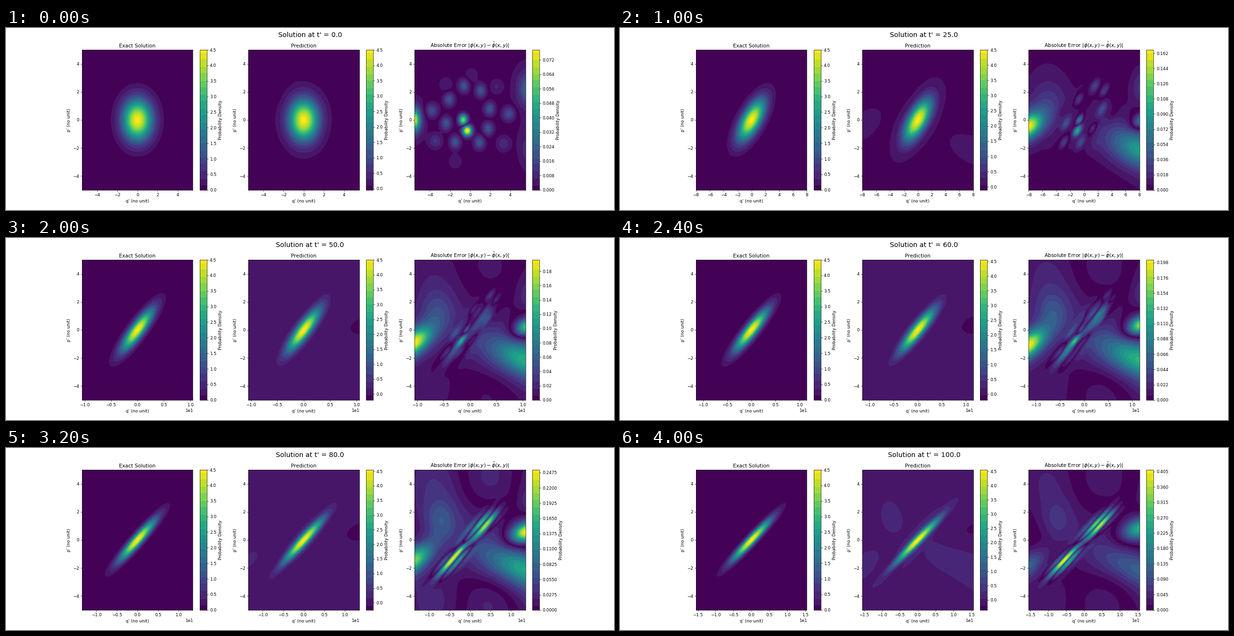
Animation, 1280 px wide and 384 px high, one loop 4200 ms. Source, as a matplotlib script:

```python
import numpy as np
import matplotlib.pyplot as plt
from matplotlib.animation import FuncAnimation
from matplotlib.colors import ListedColormap

FRAMES, STEP = 21, 5.0
SHEAR = 0.0355
PEAK = 4.49

# viridis in flat bands
x = np.linspace(0, 1, 256)
band = np.floor((x + 0.019) / 0.05)
CMAP = ListedColormap(plt.get_cmap("viridis")(np.clip(band * 0.05 + 0.006, 0, 1)))


def gauss(a, b, wa, wb):
    return np.exp(-0.5 * ((a / wa) ** 2 + (b / wb) ** 2))


def lobe(a, b, wa, wb):
    """Like gauss, with longer tails."""
    return (1 + ((a / wa) ** 2 + (b / wb) ** 2) / 6) ** -3


def top_error(t):
    return np.interp(t, [0, 5, 15, 20, 40, 60, 70, 90, 100],
                     [.0774, .1025, .142, .156, .1895, .2015, .2195, .2815, .409])


def edge_lobes(s, p, k):
    """Wide lobes near the borders; s runs from -1 to 1, k from 0 to 1."""
    ease = 1 - np.exp(-5 * k)
    left = (0.077 + 0.42 * k - 0.35 * k ** 2) * lobe(
        s + 1.01, p + 1.8 * k - 2.3 * ease * (s + 1),
        0.07 + 0.15 * ease, 0.5 + 0.1 * ease)
    right = -0.3 * k * lobe(
        s - 1.02, p + 0.4 - 1.2 * k - (s - 1), 0.06 + 0.16 * k, 0.3 + 0.2 * k)
    low = (0.008 + 0.142 * (1 - np.exp(-3.5 * k))) * lobe(
        s - 1.02, p + 2.1 + 1.2 * (s - 1), 0.1 + 0.38 * ease, 0.9)
    high = 0.085 * k * lobe(s + 0.7 - 0.2 * k, p - 1.35, 0.24, 1.2)
    corner = 0.026 * lobe(s - 1.05, p - 2.2 - 0.4 * k, 0.12, 0.8)
    swell = 0.035 * k ** 2 * np.cos(3 * (s + 0.7)) * np.cos(0.7 * (p - 4.5))
    return left + right + low + high + corner + swell


def ripples(u, p, k):
    """A close pair and two rings of spots with alternating sign."""
    pair = 0.079 * np.cos(1.4 * k) * (1 + 0.8 * k) * (
        gauss(u + 0.28, p + 0.76, 0.32, 0.26)
        - 0.8 * gauss(u + 0.68, p, 0.29, 0.26))
    rings = 0
    for n in range(8):
        sign = (-1) ** n
        a = np.radians(41 * n - 60)
        r = 2.2 + 0.35 * np.cos(a - 2.27)
        grow = 0.02 * (1 + np.sin(np.pi * k) - 0.5 * k)
        rings += sign * grow * gauss(
            u - r * np.cos(a), p - r * np.sin(a), 0.36, 0.33)
        a = np.radians(40 * n - 32)
        fade = (0.006 + 0.014 * np.cos(a) ** 8) * np.exp(-3 * k)
        rings += sign * fade * gauss(
            u - 3.9 * np.cos(a), p - 3.2 * np.sin(a), 0.45, 0.36)
    return pair + rings


def ridge(u, p, k):
    """Streaks along the sheared axis whose phase turns over at the centre."""
    phase = 1.15 * (1 - np.tanh(3 * (p + 0.2)))
    along = gauss(np.abs(p + 0.2) - 1.3, u, 0.7, 1.5)
    return 0.48 * k ** 3.5 * along * np.sin(1.6 * u + phase)


def fields(t):
    half, k = 5.5 + 0.1 * t, t / 100
    q, p = np.meshgrid(np.linspace(-half, half, 151), np.linspace(-5, 5, 151))
    u = q - SHEAR * t * p
    exact = PEAK * np.exp(-0.5 * (u ** 2 + p ** 2))
    err = edge_lobes(q / half, p, k) + ripples(u, p, k) + ridge(u, p, k)
    err *= top_error(t) / np.abs(err).max()
    return q, p, exact, err


def pred_levels(t):
    low = -1 - int(t * 6 // 100)
    high = 90 if t < 55 else 91
    return np.arange(low, high + 1) * 0.05


fig = plt.figure(figsize=(20, 6), dpi=64)


def draw(i):
    t = i * STEP
    q, p, exact, err = fields(t)
    levels = pred_levels(t)
    pred = np.clip(exact + err, levels[0] + 1e-3, levels[-1] - 1e-3)
    panels = [
        ("Exact Solution", exact, 100),
        ("Prediction", pred, levels),
        (r"Absolute Error $|\phi(x,y)-\hat{\phi}(x,y)|$", np.abs(err), 100),
    ]
    fig.clear()
    for ax, (title, z, lev) in zip(fig.subplots(1, 3), panels):
        filled = ax.contourf(q, p, z, levels=lev, cmap=CMAP)
        fig.colorbar(filled, ax=ax, label="Probability Density")
        ax.set_title(title)
        ax.set_xlabel("q' (no unit)")
        ax.set_ylabel("p' (no unit)")
        ax.ticklabel_format(axis="x", style="sci", scilimits=(0, 0))
    fig.suptitle(f"Solution at t' = {t}", fontsize=16)
    return []


anim = FuncAnimation(fig, draw, frames=FRAMES, interval=200, repeat=True)
plt.show()
```
